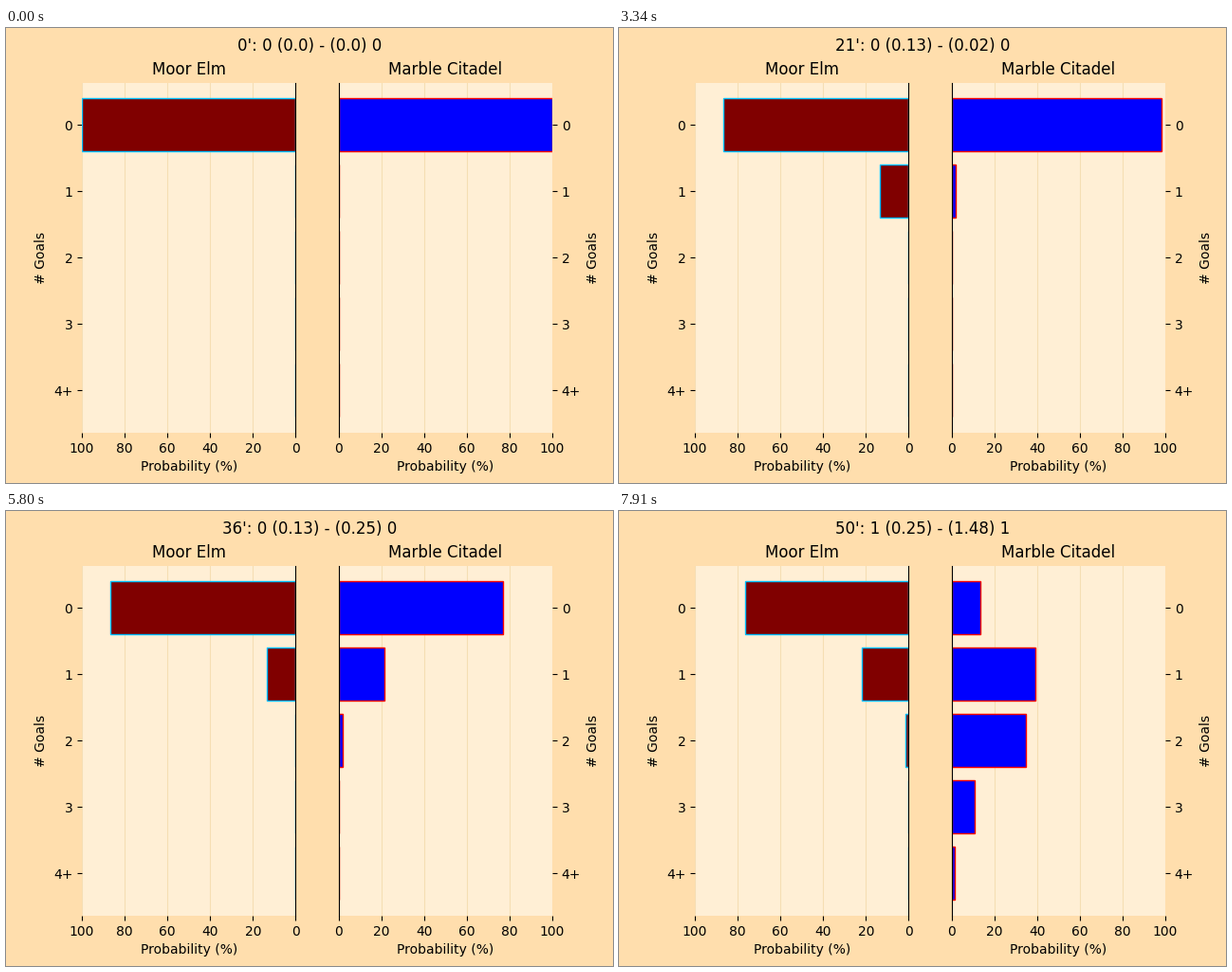
Recreate the animation shown at these times as a matplotlib script. Size 640x480 px, loop 8000 ms.

```python
import matplotlib.pyplot as plt
import numpy as np
from matplotlib.animation import FuncAnimation

LOOP, INTERVAL = 8000, 20
HOLD, STEP, STEPS = 160, 30, 5
LAST_MINUTE = 50

TEAMS = ("Moor Elm", "Marble Citadel")
FILLS = ("maroon", "blue")
EDGES = ("deepskyblue", "red")

# minute: (team, chance of each shot, goals scored)
SHOTS = {
    4: (0, [0.133], 0),
    9: (1, [0.0177], 0),
    31: (1, [0.13], 0),
    33: (1, [0.015], 0),
    35: (1, [0.088], 0),
    39: (1, [0.604, 0.0805], 1),
    44: (1, [0.057], 0),
    46: (1, [0.487], 0),
    48: (0, [0.118], 1),
}


def add_shot(dist, p):
    """Goal distribution (0, 1, 2, 3, 4+) after one more shot."""
    new = dist * (1 - p)
    new[1:] += dist[:-1] * p
    new[-1] += dist[-1] * p
    return new


def build_timeline():
    """List of (start ms, title, distributions); shot minutes are tweened."""
    dists = np.zeros((2, 5))
    dists[:, 0] = 1
    xg, goals = [0.0, 0.0], [0, 0]
    timeline, start = [], 0
    for minute in range(LAST_MINUTE + 1):
        before = dists.copy()
        team, chances, scored = SHOTS.get(minute, (0, [], 0))
        for p in chances:
            dists[team] = add_shot(dists[team], p)
            xg[team] += p
        goals[team] += scored
        title = (f"{minute}': {goals[0]} ({round(xg[0], 2)})"
                 f" - ({round(xg[1], 2)}) {goals[1]}")
        steps, hold = (STEPS, STEP) if chances else (1, HOLD)
        for k in range(1, steps + 1):
            timeline.append((start, title, before + (dists - before) * k / steps))
            start += hold
    return timeline


TIMELINE = build_timeline()
STARTS = [entry[0] for entry in TIMELINE]

fig, axes = plt.subplots(1, 2, figsize=(6.4, 4.8), dpi=100,
                         facecolor="navajowhite")
heading = fig.suptitle("")


def style(ax, team):
    bars = ax.barh(range(5), [0] * 5, color=FILLS[team], edgecolor=EDGES[team])
    ax.set_title(TEAMS[team])
    ax.set_facecolor("papayawhip")
    ax.set_axisbelow(True)
    ax.grid(axis="x", color="wheat")
    ax.set_xlim((100, 0) if team == 0 else (0, 100))
    ax.set_xticks(range(0, 101, 20))
    ax.set_ylim(4.64, -0.64)
    ax.set_yticks(range(5), ["0", "1", "2", "3", "4+"])
    ax.set_xlabel("Probability (%)")
    ax.set_ylabel("# Goals")
    if team == 1:
        ax.yaxis.tick_right()
        ax.yaxis.set_label_position("right")
    inner = "right" if team == 0 else "left"
    for side, spine in ax.spines.items():
        spine.set_visible(side == inner)
    return bars


charts = [style(ax, team) for team, ax in enumerate(axes)]


def update(frame):
    t = (frame + 0.5) * INTERVAL
    _, title, dists = TIMELINE[np.searchsorted(STARTS, t, side="right") - 1]
    heading.set_text(title)
    for bars, dist in zip(charts, dists):
        for bar, p in zip(bars, dist):
            bar.set_width(100 * p)
    return [heading, *charts[0], *charts[1]]


anim = FuncAnimation(fig, update, frames=LOOP // INTERVAL, interval=INTERVAL,
                     repeat=True, repeat_delay=0)
plt.show()
```
